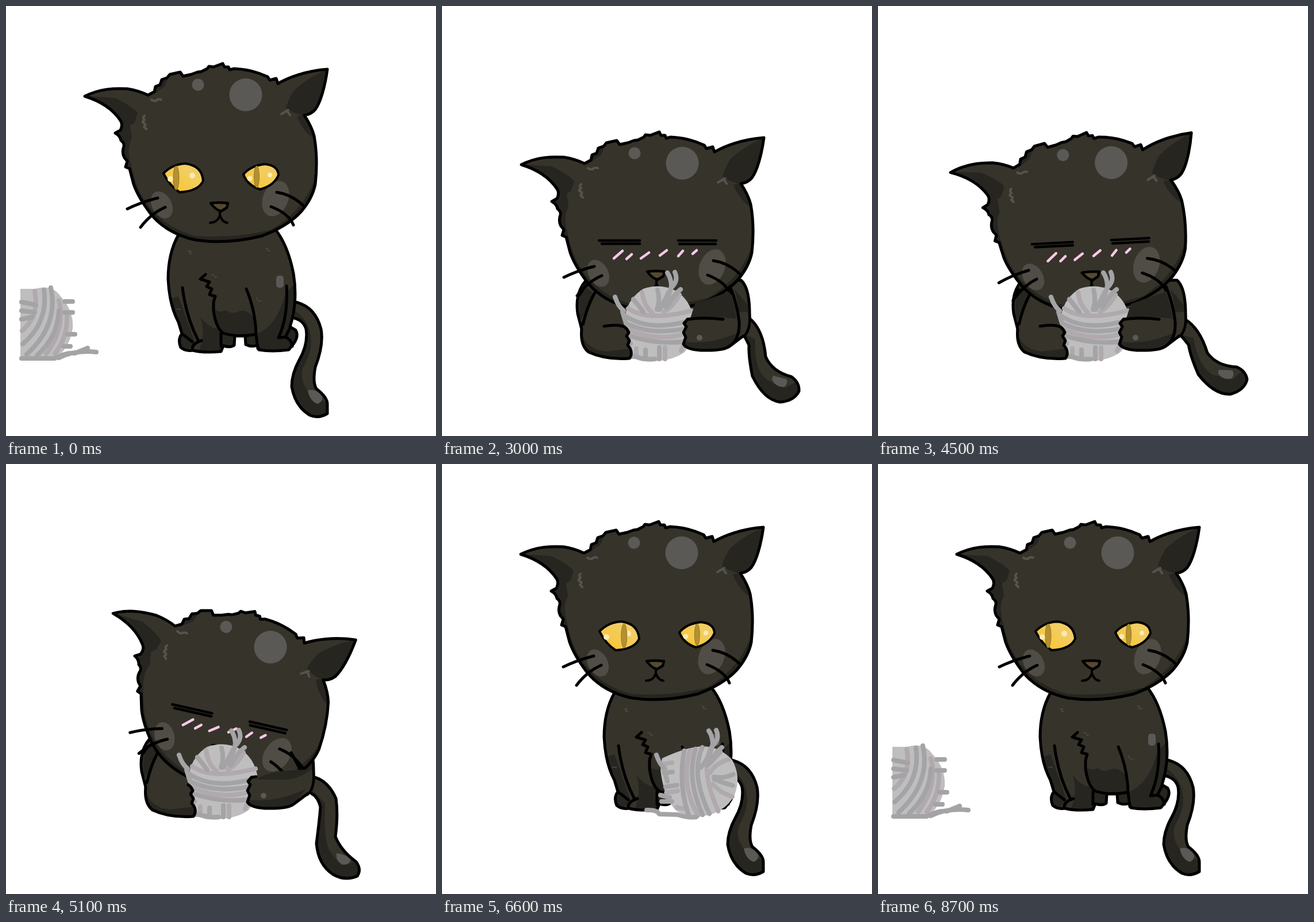
An HTML page for the animation above (9000 ms loop, 748 by 748 pixels).

```html
<!DOCTYPE html>
<html lang="en">
<head>
<meta charset="utf-8">
<title>Kitten and yarn</title>
<style>
html, body { margin: 0; width: 100%; height: 100%; overflow: hidden; background: #fff; }
svg { display: block; width: 100vw; height: 100vh; }
path { stroke-linecap: round; stroke-linejoin: round; }
.fur { fill: #36332b; }
.ink { fill: none; stroke: #000; stroke-width: 5; }
.outlined { fill: #36332b; stroke: #000; stroke-width: 5; }
.shade { fill: #262520; }
.spot { fill: #5a5956; }
.cheek { fill: #504d46; }
.tuft { fill: none; stroke: #55534d; stroke-width: 4; }
.hair { fill: none; stroke: #5a5850; stroke-width: 1; }
.blush { fill: none; stroke: #f9c8e8; stroke-width: 4.5; }
.eye { fill: url(#amber); stroke: #000; stroke-width: 4; }
.pupil { fill: #b4912f; stroke: #957725; stroke-width: 1; }
.glint { fill: #fceab4; }
.wool { fill: #bfbebf; }
.thread { fill: none; stroke: #a4a3a5; stroke-width: 8; }
.warm { stroke: #b0a9ad; }
</style>
</head>
<body>
<svg viewBox="0 0 748 748">
<defs>
  <linearGradient id="amber" x1="1" y1="0" x2="0" y2="1">
    <stop offset=".35" stop-color="#f1cd62"/><stop offset="1" stop-color="#fdc321"/>
  </linearGradient>
  <path id="skull" d="M137 157C165 143 190 143 211 144Q230 147 247 155L258 149 260 140 268 137 271 128 280 125 285 119 303 115 308 122 322 119 333 115 340 114 350 109 353 105 361 106 377 100 380 106 387 106 389 111 397 109Q420 110 440 117L455 123 459 129 470 126 473 135C490 125 520 113 559 110C555 140 547 168 538 180Q530 189 519 190Q532 210 536 226Q543 265 538 310Q533 335 513 358Q490 383 445 400Q385 415 330 407Q280 396 252 362Q230 333 222 310L215 283 208 280 211 270 206 264Q201 255 205 244Q206 238 200 234Q199 226 190 221L199 216Q204 206 199 199C185 178 163 165 137 157Z"/>
  <path id="sitTail" d="M504 515Q538 523 548 562Q553 590 538 628Q533 655 540 666Q560 681 559 694V709Q544 718 529 712Q503 697 497 662Q497 640 510 616Q526 588 522 562Q517 545 497 542"/>
  <path id="tailA" d="M537 545Q559 565 563 610Q574 636 608 645Q622 655 621 670Q613 687 588 689Q560 685 540 644Q533 610 534 590L525 572"/>
  <path id="tailB" d="M537 545Q561 552 574 582Q578 610 573 648Q582 672 609 692Q619 705 611 717Q590 726 569 714Q543 697 540 660Q545 622 547 597Q543 579 531 573"/>
  <path id="torso" d="M300 398Q282 430 282 475Q284 520 300 550L306 570Q298 580 304 594Q313 601 325 599Q345 604 374 601L378 591Q392 595 397 590L398 574H416L417 589Q428 594 437 590L440 598Q462 602 492 598L500 588Q510 574 504 564L494 558Q508 515 500 465Q490 415 468 388Z"/>
  <clipPath id="inSkull"><use href="#skull"/></clipPath>
  <clipPath id="inSitTail"><use href="#sitTail"/></clipPath>
  <clipPath id="inTailA"><use href="#tailA"/></clipPath>
  <clipPath id="inTailB"><use href="#tailB"/></clipPath>
  <clipPath id="inTorso"><use href="#torso"/></clipPath>
</defs>

<g id="sit">
  <use href="#sitTail" class="fur"/>
  <path clip-path="url(#inSitTail)" class="shade" d="M495 525Q528 545 530 575Q534 600 516 630Q510 655 530 675L562 692V722H490V600L518 570Z"/>
  <path class="spot" d="M525 669Q540 664 550 680Q551 690 541 692Q528 686 525 669Z"/>
  <use href="#sitTail" class="ink"/>
  <use href="#torso" class="fur"/>
  <g clip-path="url(#inTorso)" class="shade">
    <path d="M362 527Q372 535 382 529Q394 538 405 531Q420 526 434 545L438 595H372Z"/>
    <path d="M300 505Q318 555 330 590L304 602 285 510Z"/>
    <path d="M338 540Q352 560 370 562L378 602H335Q348 570 338 540Z"/>
    <path d="M438 570Q472 555 486 500L505 480V590L470 602H440Z"/>
  </g>
  <rect class="spot" x="470" y="469" width="13" height="21" rx="5"/>
  <path class="hair" d="M316 427l6-1-3 4 5 1M451 421l5 1-2 3 6 1M357 467l5 1 1 4 4-1M436 507q1 8 8 6M296 527l8 1"/>
  <use href="#torso" class="ink"/>
  <path class="ink" d="M307 490Q313 540 334 581M306 570L324 584M340 582Q324 587 324 597M347 467L338 475 354 480 349 488 358 492 354 502 364 505 361 515V530Q365 560 378 569Q402 577 435 571M374 570V592M418 492Q434 530 435 571L438 596M488 487Q491 540 474 577L486 576Q497 580 498 592M494 560L487 574"/>
</g>

<g id="lie">
  <g id="swayTail">
    <use href="#tailA" class="fur"/>
    <path clip-path="url(#inTailA)" class="shade" d="M525 570L545 580Q542 630 565 650Q585 660 598 664L618 652 640 700H530Z"/>
    <path class="spot" d="M576 643L599 649Q603 656 595 663Q578 662 574 649Z"/>
    <use href="#tailA" class="ink"/>
  </g>
  <g id="lowTail">
    <use href="#tailB" class="fur"/>
    <path clip-path="url(#inTailB)" class="shade" d="M530 565L555 590Q552 660 565 676Q580 697 592 697L612 690 625 730H530Z"/>
    <path class="spot" d="M575 677Q592 679 600 688Q597 698 585 697Q573 690 575 677Z"/>
    <use href="#tailB" class="ink"/>
  </g>
  <path class="outlined" d="M250 478Q231 500 236 535L243 562 330 580H430L524 575Q537 565 535 535Q535 490 520 477Z"/>
  <path class="shade" d="M246 485Q235 510 241 550L263 500ZM508 492Q520 525 518 572L526 570Q534 555 532 520Z"/>
  <path class="ink" d="M237 505L245 494M268 495Q250 525 243 565"/>
</g>

<g id="head">
  <use href="#skull" class="fur"/>
  <g clip-path="url(#inSkull)" class="shade">
    <path d="M130 156L190 160Q222 176 229 186L224 202 216 208 219 230Q211 245 215 265Q222 300 232 322Q262 382 330 400Q400 405 465 388V420H300L190 300Z"/>
    <path d="M558 110Q520 128 500 148Q490 165 487 177Q505 190 520 190L560 190Z"/>
    <path d="M506 192Q514 215 534 230L545 222 522 188ZM537 300Q519 355 460 390L500 400 560 300Z"/>
    <path d="M245 156L258 146 272 125 285 118 276 140 256 154Z"/>
  </g>
  <circle class="spot" cx="334" cy="137" r="10.5"/>
  <circle class="spot" cx="417" cy="154.5" r="28.5"/>
  <path class="tuft" d="M253 163q6 4 9 1t8-1M241 191q-4 3 0 7q-6 4-1 6t0 6l4 4M479 188l10-6 5 8M487 184l4-3"/>
  <ellipse class="cheek" cx="271" cy="346" rx="17" ry="25" transform="rotate(-28 271 346)"/>
  <ellipse class="cheek" cx="469" cy="335" rx="22" ry="32" transform="rotate(22 469 335)"/>
  <use href="#skull" class="ink"/>
  <path class="ink" d="M211 353Q235 341 264 334M234 385Q252 361 277 350M471 324Q497 328 517 347M461 349Q492 361 500 381"/>
  <path d="M356 343Q371 341 386 343L384 351 374 357Q365 355 356 343Z" fill="#554a31" stroke="#000" stroke-width="4.5"/>
  <path class="ink" style="stroke-width:4" d="M372 357V364Q368 377 355 377M372 364Q376 376 385 377"/>
  <g id="open">
    <path class="eye" d="M274 291Q290 275 312 274Q341 278 343 304Q335 322 302 324Q284 312 274 291Z"/>
    <path class="eye" d="M413 293Q425 278 450 275Q473 277 474 294Q467 312 442 319Q420 312 413 293Z"/>
    <circle class="glint" cx="286" cy="301" r="5"/><circle class="glint" cx="324" cy="295" r="5"/>
    <circle class="glint" cx="424" cy="300" r="4.5"/><circle class="glint" cx="459" cy="294" r="4"/>
    <ellipse id="pupilL" class="pupil" cx="312" cy="299" rx="5" ry="21"/>
    <ellipse id="pupilR" class="pupil" cx="442" cy="297" rx="4.5" ry="19"/>
  </g>
  <g id="shut">
    <path class="ink" style="stroke-width:4.5" d="M272 289H343M277 294.5H343M410 289H476M412 295H475"/>
    <path class="blush" d="M298 320L313 307M320 321L329 313M345 320L359 310M378 315L390 306M410 316L418 307M435 312L442 306"/>
  </g>
</g>

<g id="farBall">
  <path class="wool" d="M25 492H50Q80 483 95 505Q118 530 116 560Q110 600 80 616H25Z"/>
  <path class="thread warm" d="M92 512Q104 560 70 605M106 535Q108 575 85 605M50 496Q58 540 28 565"/>
  <path class="thread" d="M66 494Q74 550 29 588M78 490Q92 555 36 606M92 530Q90 575 54 608M27 515L52 520M27 530L50 533M27 545L46 541M102 514h14M102 533h14M107 571h13M100 592h12M27 613H85Q105 602 120 604L142 595M92 612Q120 598 157 602"/>
</g>

<g id="ball">
  <g id="skein">
    <path class="wool" d="M-60-10Q-56-42-28-60Q0-70 26-58Q52-44 59-12Q64 28 44 50Q20 68-30 66L-50 60Q-62 20-60-10Z"/>
    <path class="thread warm" d="M-54-26Q-20-2 56-22M-56 10Q0 36 58 14M-30-54Q-27-30-12-18M35-50Q25-30 8-20M-40 44V58M10 42V62M42 38L38 48"/>
    <path class="thread" d="M-58-12Q-15 16 58-6M-57 0Q-10 24 58 6M-57 20Q0 40 54 30M-45-42L-28-20M-3-58Q2-40-4-24M16-54Q8-36 0-24M-24 46V60M0 42V62"/>
  </g>
  <path class="thread" d="M0-24Q18-45 21-66Q20-80 14-88M21-62Q34-74 27-89M12-28Q25-50 37-59M-77-46Q-72-30-62-22M-64-20L-58 0M-70 24L-54 28M-68 35H-50"/>
  <path class="thread" d="M-94 50Q-76 49-72 57L-40 58Q-22 64-8 62"/>
</g>

<g id="paws">
  <path class="fur" d="M245 556Q240 590 255 602Q285 616 326 612Q332 605 327 595L323 590 326 582 321 574 325 568Q318 552 295 546Z"/>
  <path class="shade" d="M245 575Q255 598 285 601L326 596V612Q285 616 255 602Q243 592 245 575Z"/>
  <path class="ink" d="M243 562Q240 590 255 602Q285 616 326 613Q332 605 327 595L323 590 326 582 321 574 325 568Q322 561 317 558"/>
  <path class="fur" d="M427 545Q455 533 532 532Q536 560 524 573L500 592Q470 602 422 594L420 588 424 576 420 568 425 558 421 552Z"/>
  <path class="shade" d="M422 584Q470 590 522 565L500 593Q460 602 422 594Z"/>
  <path class="ink" d="M435 544L427 545 421 552 425 558 420 568 424 576 420 588Q424 597 450 599Q490 600 500 592L524 574"/>
  <g id="gripping">
    <path class="shade" d="M440 518L500 497Q510 520 512 544Q470 538 432 543Z"/>
    <path class="ink" d="M317 558Q305 553 282 557M427 545Q455 541 489 545M500 592Q518 580 517 550Q514 520 501 488"/>
  </g>
  <g id="resting">
    <path class="shade" d="M436 549Q455 532 530 532Q515 545 490 549Z"/>
    <path class="ink" d="M496 502L511 530"/>
  </g>
  <circle class="spot" cx="448" cy="577" r="5"/>
</g>
</svg>
<script>
const STEP = 300, COUNT = 30, LIE_FROM = 8, LIE_TO = 20, CENTRE = 362;
const el = id => document.getElementById(id);
const show = (id, on) => el(id).setAttribute('display', on ? 'inline' : 'none');
const move = (id, value) => el(id).setAttribute('transform', value);

// Ball positions while the cat sits; null means it rests at the far left.
const rollIn = [null, 120, 162, 212, 262, 312, 362, 395];
const rollOut = [400, 450, 500, 455, 410, 362, 300, 220, null];

// Lying steps: head tilt, head drop, tail swing (null = low tail).
const nap = [
  [0, 119, 0], [0, 124, -12], [0, 119, 0], [0, 124, -12], [0, 122, -6],
  [0, 119, 0], [-6.5, 120, -25], [-3, 120, -12], [5, 122, null],
  [12.6, 122, null], [8, 122, null], [4, 123, null], [0, 125, null]
];

function drawLying([tilt, drop, swing]) {
  const pivot = tilt > 0 ? '248 366' : '372 390';
  const resting = swing === null;
  move('head', `translate(1 ${drop}) rotate(${tilt} ${pivot})`);
  for (const id of ['lowTail', 'resting']) show(id, resting);
  for (const id of ['swayTail', 'gripping']) show(id, !resting);
  if (!resting) move('swayTail', `rotate(${swing} 535 560)`);
}

function drawSitting(x) {
  const look = x === null ? -1 : (x - CENTRE) / 300;
  move('head', '');
  move('pupilL', `translate(${16 * look} 0)`);
  move('pupilR', `translate(${6 * look} 0)`);
}

function draw(step) {
  const lying = step >= LIE_FROM && step <= LIE_TO;
  const x = lying ? 378 : step < LIE_FROM ? rollIn[step] : rollOut[step - LIE_TO - 1];
  for (const id of ['lie', 'paws', 'shut']) show(id, lying);
  for (const id of ['sit', 'open']) show(id, !lying);
  show('farBall', x === null);
  show('ball', x !== null);
  if (x !== null) {
    move('ball', `translate(${x} 552)`);
    move('skein', `rotate(${lying ? 0 : (x - CENTRE) * 0.92})`);
  }
  if (lying) drawLying(nap[step - LIE_FROM]);
  else drawSitting(x);
}

const start = performance.now();
function tick() {
  draw(Math.floor((performance.now() - start) / STEP) % COUNT);
  requestAnimationFrame(tick);
}
tick();
</script>
</body>
</html>
```
